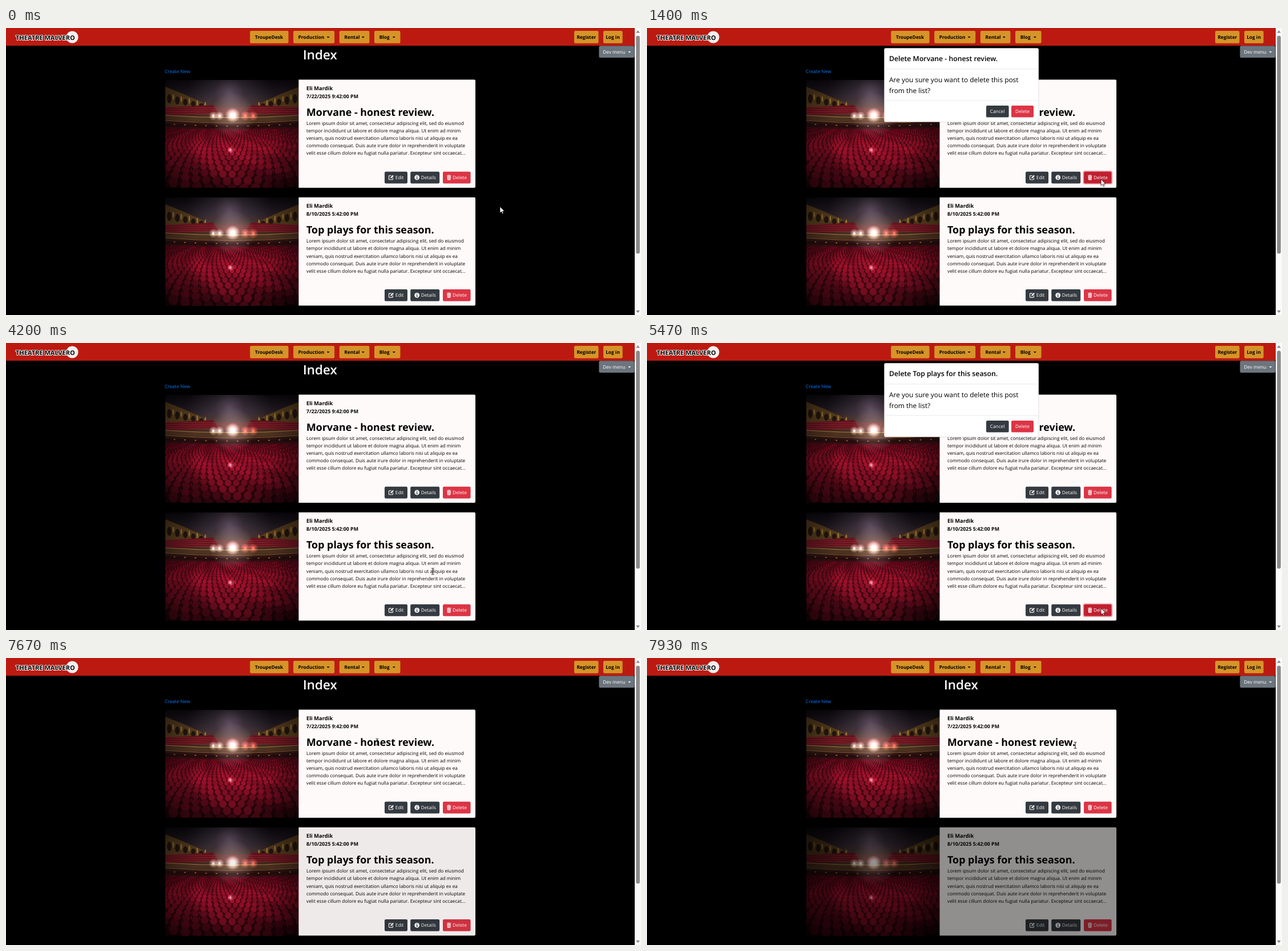
These frames come from a looping animation (1112 by 503 pixels, 8000 ms). An HTML page with a canvas:

```html
<!DOCTYPE html>
<html lang="en">
<head>
<meta charset="utf-8">
<title>Index</title>
<style>
html, body { margin: 0; width: 100%; height: 100%; overflow: hidden; background: #000; }
svg, canvas { position: absolute; display: block; }
svg { left: 0; top: 0; }
canvas { left: 279px; }
#photo1 { top: 91px; }
#photo2 { top: 297px; }
text { font: 8.25px "Open Sans", "Noto Sans", sans-serif; text-rendering: geometricPrecision; white-space: pre; }
.b { font-weight: 700; font-size: 8.3px; }
.w { fill: #fff; }
.logo { font-weight: 700; font-size: 11px; stroke: #fff; stroke-width: 1.8px; paint-order: stroke; stroke-linejoin: round; }
.h1 { font-weight: 600; font-size: 22.4px; }
.name { font-weight: 700; font-size: 9.3px; }
.date { font-weight: 700; font-size: 8.8px; }
.title { font-weight: 700; font-size: 17.87px; }
.ask { font-size: 11.9px; }
.head { font-weight: 600; font-size: 12.25px; }
.gold { fill: #d69428; }
.dark { fill: #343a40; }
.red { fill: #dc3545; }

.anim, .step { animation: 8s linear infinite; }
.step { animation-timing-function: step-end; }
.fade { animation-name: fade; }
#modal { animation-name: modal; }
#cursor { animation-name: path; }
#arrow { animation-name: arrow; }
#hand { animation-name: hand; }
#beam { animation-name: beam; }
#del1 { animation-name: del1; }
#del2 { animation-name: del2; }
#ring1 { animation-name: ring1; }
#ring2 { animation-name: ring2; }
#cancel { animation-name: cancel; }
#confirm { animation-name: confirm; }
#first { animation-name: first; }
#second { animation-name: second; }

@keyframes fade {
  0%, 94.15% { opacity: 1; }
  95.875% { opacity: .94; }
  99.125% { opacity: .57; }
  100% { opacity: .5; }
}
@keyframes modal {
  0%, 15.5%, 41.6%, 66.25%, 95%, 100% { opacity: 0; transform: translateX(-24px); }
  17.4%, 40.5%, 68.3%, 93% { opacity: 1; transform: translateX(0); }
}
@keyframes path {
  0%, 5% { transform: translate(865px, 313px); animation-timing-function: ease-in-out; }
  14.125%, 27.5% { transform: translate(795px, 265px); animation-timing-function: ease-in-out; }
  36.625%, 44.125% { transform: translate(608px, 152px); animation-timing-function: cubic-bezier(.4, 0, .7, .9); }
  52.5% { transform: translate(747px, 400px); animation-timing-function: ease-out; }
  55% { transform: translate(778px, 431px); animation-timing-function: ease-in-out; }
  61.625%, 63.3% { transform: translate(806px, 465px); animation-timing-function: step-end; }
  63.375%, 77.5% { transform: translate(795px, 465px); animation-timing-function: ease-in-out; }
  88.375% { transform: translate(668px, 149px); animation-timing-function: ease-out; }
  90%, 96.3% { transform: translate(650px, 147px); animation-timing-function: ease-in-out; }
  99.1%, 100% { transform: translate(750px, 153px); }
}
@keyframes arrow {
  0%, 15.875%, 47.6%, 55.4%, 66.625% { opacity: 1; }
  11.25%, 35.25%, 49.3%, 59.3%, 86.9%, 100% { opacity: 0; }
}
@keyframes hand {
  0%, 15.875%, 41.6%, 66.625%, 95%, 100% { opacity: 0; }
  11.25%, 35.25%, 59.3%, 86.9% { opacity: 1; }
}
@keyframes beam {
  0%, 47.6%, 55.4% { opacity: 0; }
  41.6%, 49.3%, 95%, 100% { opacity: 1; }
}
@keyframes del1 {
  0%, 41.6%, 100% { fill: #dc3545; }
  11.25% { fill: #c82333; }
  15.875% { fill: #c01f30; }
  28.9% { fill: #d02838; }
}
@keyframes del2 {
  0%, 93.375%, 100% { fill: #dc3545; }
  59.3% { fill: #c82333; }
  66.625% { fill: #c01f30; }
  79.2% { fill: #d02838; }
}
@keyframes ring1 { 0%, 41.6%, 100% { opacity: 0; } 15.875% { opacity: 1; } }
@keyframes ring2 { 0%, 93.375%, 100% { opacity: 0; } 66.625% { opacity: 1; } }
@keyframes cancel { 0%, 42%, 100% { fill: #343a40; } 35.25% { fill: #23272b; } }
@keyframes confirm { 0%, 96%, 100% { fill: #dc3545; } 86.9% { fill: #c82333; } }
@keyframes first { 0% { opacity: 1; } 50%, 100% { opacity: 0; } }
@keyframes second { 0% { opacity: 0; } 50%, 100% { opacity: 1; } }
</style>
</head>
<body>
<canvas id="photo1" width="234" height="189"></canvas>
<canvas id="photo2" class="anim fade" width="234" height="190"></canvas>
<svg width="1112" height="503" viewBox="0 0 1112 503">
  <defs>
    <path id="caret" d="M0 0h5l-2.5 2.6z"/>
    <g id="post">
      <text x="526" y="170.2">Lorem ipsum dolor sit amet, consectetur adipiscing elit, sed do eiusmod</text>
      <text x="526" y="183.2">tempor incididunt ut labore et dolore magna aliqua. Ut enim ad minim</text>
      <text x="526" y="196.3">veniam, quis nostrud exercitation ullamco laboris nisi ut aliquip ex ea</text>
      <text x="526" y="209.3">commodo consequat. Duis aute irure dolor in reprehenderit in voluptate</text>
      <text x="526" y="222.3">velit esse cillum dolore eu fugiat nulla pariatur. Excepteur sint occaecat...</text>
      <rect class="dark" x="663" y="251.8" width="40" height="20.6" rx="2.2"/>
      <rect class="dark" x="708.2" y="251.8" width="51" height="20.6" rx="2.2"/>
      <g fill="none" stroke="#fff">
        <path d="M675 258.8h-3.6q-.9 0-.9.9v5.2q0 .9.9.9h5.2q.9 0 .9-.9v-2.6" stroke-width="1.1"/>
        <path d="M673.7 263l4.5-4.5" stroke-width="2.2"/>
      </g>
      <circle class="w" cx="719.7" cy="262" r="4.4"/>
      <path class="dark" d="M719 259h1.4v1.3H719zM718.6 261.2h1.8v2.6h.6v1h-2.4v-1h.6v-1.6h-.6z"/>
      <text class="w" x="681.8" y="265.1">Edit</text>
      <text class="w" x="726.7" y="265.1">Details</text>
    </g>
    <g id="trash">
      <path class="w" d="M772 258.2h2.2l.5-.8h2l.5.8h2.2v1.1H772zM772.5 260h6.4l-.4 5.6q-.1.9-.9.9h-3.8q-.8 0-.9-.9z"/>
      <path d="M774.2 261v4.4M775.7 261v4.4M777.2 261v4.4" stroke="#dc3545" stroke-width=".6"/>
      <text class="w" x="782" y="265.1">Delete</text>
    </g>
    <rect id="ring" x="764.2" y="251" width="50.2" height="22.2" rx="3" fill="none" stroke="#e15361" stroke-opacity=".5" stroke-width="1.8"/>
  </defs>

  <rect width="1101" height="31" fill="#bc1a11"/>
  <circle cx="116" cy="16" r="10.6" fill="#f6eeee"/>
  <text class="logo" x="17" y="20.6">THEATRE MALVERO</text>
  <g class="gold">
    <rect x="427.3" y="5" width="67.3" height="21.8" rx="2.2"/>
    <rect x="503.2" y="5" width="72" height="21.8" rx="2.2"/>
    <rect x="583.8" y="5" width="52.6" height="21.8" rx="2.2"/>
    <rect x="645" y="5" width="45.5" height="21.8" rx="2.2"/>
    <rect x="995" y="5" width="42.5" height="21.8" rx="2.2"/>
    <rect x="1046" y="5" width="33.7" height="21.8" rx="2.2"/>
  </g>
  <text class="b" x="436" y="18.9">TroupeDesk</text>
  <text class="b" x="511.8" y="18.9">Production</text>
  <text class="b" x="592.5" y="18.9">Rental</text>
  <text class="b" x="653.7" y="18.9">Blog</text>
  <text class="b" x="999.4" y="18.9">Register</text>
  <text class="b" x="1050.2" y="18.9">Log in</text>
  <use href="#caret" x="561.6" y="15"/>
  <use href="#caret" x="622.8" y="15"/>
  <use href="#caret" x="676.8" y="15"/>

  <text class="h1 w" x="520" y="55.3">Index</text>
  <text x="278" y="78.9" fill="#007bff">Create New</text>
  <rect x="1038.4" y="31.3" width="62.2" height="20.7" rx="2.2" fill="#6c757d"/>
  <text class="w" x="1045.3" y="45">Dev menu</text>
  <use href="#caret" class="w" x="1089.3" y="41"/>

  <g>
    <path d="M512.5 90.5H820q2 0 2 2V278q0 2-2 2H512.5z" fill="#fffafa"/>
    <text class="name" x="526" y="109">Eli Mardik</text>
    <text class="date" x="526" y="123.2">7/22/2025 9:42:00 PM</text>
    <text class="title" x="526" y="153.5">Morvane - honest review.</text>
    <use href="#post"/>
    <rect id="del1" class="red step" x="765" y="251.8" width="48.6" height="20.6" rx="2.2"/>
    <g id="ring1" class="step"><use href="#ring"/></g>
    <use href="#trash"/>
  </g>

  <g class="anim fade">
    <g transform="translate(0 206.3)">
      <path d="M512.5 90.5H820q2 0 2 2V278.2q0 2-2 2H512.5z" fill="#fffafa"/>
      <text class="name" x="526" y="109">Eli Mardik</text>
      <text class="date" x="526" y="123.2">8/10/2025 5:42:00 PM</text>
      <text class="title" x="526" y="153.5">Top plays for this season.</text>
      <use href="#post"/>
      <rect id="del2" class="red step" x="765" y="251.8" width="48.6" height="20.6" rx="2.2"/>
      <g id="ring2" class="step"><use href="#ring"/></g>
      <use href="#trash"/>
    </g>
  </g>

  <rect x="1101" width="11" height="503" fill="#fafafa"/>
  <rect x="1103.3" y="13.5" width="6.6" height="382" rx="3.3" fill="#8a8a8a"/>
  <path d="M1103.3 8.6h6.6l-3.3-4.6zM1103.3 495h6.6l-3.3 4.6z" fill="#8a8a8a"/>

  <g id="modal" class="anim">
    <rect x="415.3" y="35.2" width="270.6" height="129.6" rx="2.6" fill="#fff" stroke="#000" stroke-opacity=".2" stroke-width=".6"/>
    <path d="M415.5 71.9h270M415.5 127.1h270" stroke="#dee2e6" stroke-width=".8"/>
    <text id="first" class="head step" x="424" y="58">Delete Morvane - honest review.</text>
    <text id="second" class="head step" x="424" y="58">Delete Top plays for this season.</text>
    <text class="ask" x="424" y="95.3">Are you sure you want to delete this post</text>
    <text class="ask" x="424" y="114.3">from the list?</text>
    <rect id="cancel" class="dark step" x="594" y="136" width="39.6" height="20.6" rx="2.2"/>
    <rect id="confirm" class="red step" x="638" y="136" width="39" height="20.6" rx="2.2"/>
    <text class="w" x="600.8" y="149.3">Cancel</text>
    <text class="w" x="645" y="149.3">Delete</text>
  </g>

  <g id="cursor" class="anim">
    <path id="arrow" class="step" d="M0 0v11.2l2.6-2.4 1.7 4 1.8-.8-1.7-3.8h3.5z" fill="#fff" stroke="#000" stroke-width=".7"/>
    <g id="hand" class="step">
      <path d="M-1.2 9V.6Q-1.2-.6 0-.6T1.2.6V5q1.1-.8 2 .3 1.2-.7 2 .4 1.6-.5 1.6 1.2v4.2q0 1.8-1.1 3v2.2h-6v-2L-4 9.6q-.9-1.5.4-1.8 1-.2 2.4 1.6z" fill="#fff" stroke="#000" stroke-width=".8"/>
      <path d="M1.2 5v3M3.2 5.4V8M5.2 5.8v2.4" stroke="#000" stroke-width=".6"/>
    </g>
    <path id="beam" class="step" d="M-2.3-5.3h1.5L0-4.6l.8-.7h1.5M0-4.6v9.2M-2.3 5.3h1.5L0 4.6l.8.7h1.5" fill="none" stroke="#000"/>
  </g>
</svg>
<script>
// Auditorium seen from the stage: soft tones, rows of seats and a few lamps.
function paint(canvas) {
  const g = canvas.getContext('2d'), W = 234, H = 190, mid = W / 2;

  const glow = (x, y, r, rgb, a) => {
    const f = g.createRadialGradient(x, y, 0, x, y, r);
    f.addColorStop(0, `rgba(${rgb},${a})`);
    f.addColorStop(.35, `rgba(${rgb},${a * .4})`);
    f.addColorStop(1, `rgba(${rgb},0)`);
    g.fillStyle = f;
    g.fillRect(x - r, y - r, 2 * r, 2 * r);
  };
  const oval = (x, y, rx, ry, color) => {
    g.fillStyle = color;
    g.beginPath();
    g.ellipse(x, y, rx, ry, 0, 0, 7);
    g.fill();
  };
  const shape = (pts, color) => {
    g.fillStyle = color;
    g.beginPath();
    pts.forEach(p => g.lineTo(...p));
    g.fill();
  };
  const band = (y, sag, width, color) => {
    g.strokeStyle = color;
    g.lineWidth = width;
    g.beginPath();
    g.moveTo(0, y);
    g.quadraticCurveTo(mid, y + sag, W, y);
    g.stroke();
  };

  const base = g.createLinearGradient(0, 0, 0, H);
  [[0, '#0d0a0f'], [.14, '#251d25'], [.3, '#49301f'], [.4, '#2b1412'],
   [.46, '#3a0a12'], [.6, '#7e0d22'], [.8, '#5c0a1a'], [1, '#180408']]
    .forEach(s => base.addColorStop(...s));
  g.fillStyle = base;
  g.fillRect(0, 0, W, H);
  glow(112, 22, 75, '150,125,150', .5);

  for (const side of [1, -1]) {
    g.save();
    if (side < 0) { g.translate(W, 0); g.scale(-1, 1); }
    shape([[0, 12], [30, 24], [62, 38], [74, 46], [74, 58], [0, 60]], '#5d411f');
    for (let i = 0; i < 5; i++) {
      oval(7 + i * 14, 33 + i * 3, 4, 8 - i, '#241710');
      oval(14 + i * 14, 30 + i * 3.4, 1.3, 5, '#a17a38');
    }
    shape([[0, 48], [84, 44], [92, 57], [0, 64]], '#65131d');
    g.restore();
  }
  for (let i = 0; i < 4; i++) band(48 + i * 3.6, 3, 1, '#8c2730');
  band(66, 8, 8, '#4d3220');
  band(62, 8, 1, '#a5804c');
  band(71, 9, 1, '#8a5c30');
  band(79, 6, 5, '#230d0c');
  for (let i = 0; i < 12; i++) oval(16 + i * 18.4, 78 + Math.sin(i / 11 * Math.PI) * 3, 1.6, .8, '#c77a3c');

  let s = 2.6;
  for (let y = 88, row = 0; y < 204; y += s * .85, s *= 1.13, row++) {
    const step = s * 1.12, n = Math.ceil(mid / step) + 1;
    for (let i = -n; i <= n; i++) {
      const x = mid + (i + row % 2 / 2) * step, off = Math.abs(x - mid) / mid;
      const dy = y - off * off * s * .8;
      const depth = 1 - Math.abs(y - 122) / 88;
      const l = 9 + 27 * Math.max(0, depth) * (1 - .4 * off) + 3 * Math.sin(i * 7.3 + row * 5.1);
      oval(x, dy + s * .2, s * .54, s * .58, `hsl(350,85%,${l * .35}%)`);
      oval(x, dy, s * .45, s * .48, `hsl(349,80%,${l}%)`);
    }
  }

  const shade = g.createRadialGradient(mid, 95, 70, mid, 95, 160);
  shade.addColorStop(0, 'rgba(0,0,0,0)');
  shade.addColorStop(1, 'rgba(0,0,0,.6)');
  g.fillStyle = shade;
  g.fillRect(0, 0, W, H);

  g.globalCompositeOperation = 'lighter';
  glow(118, 62, 40, '255,225,220', .5);
  glow(118, 62, 13, '255,255,255', 1);
  [84, 95].forEach(x => glow(x, 63, 8, '255,245,240', 1));
  [140, 154].forEach(x => glow(x, 63, 9, '255,90,80', 1));
  glow(114, 123, 6, '255,220,225', .9);
}
document.querySelectorAll('canvas').forEach(paint);
</script>
</body>
</html>
```
